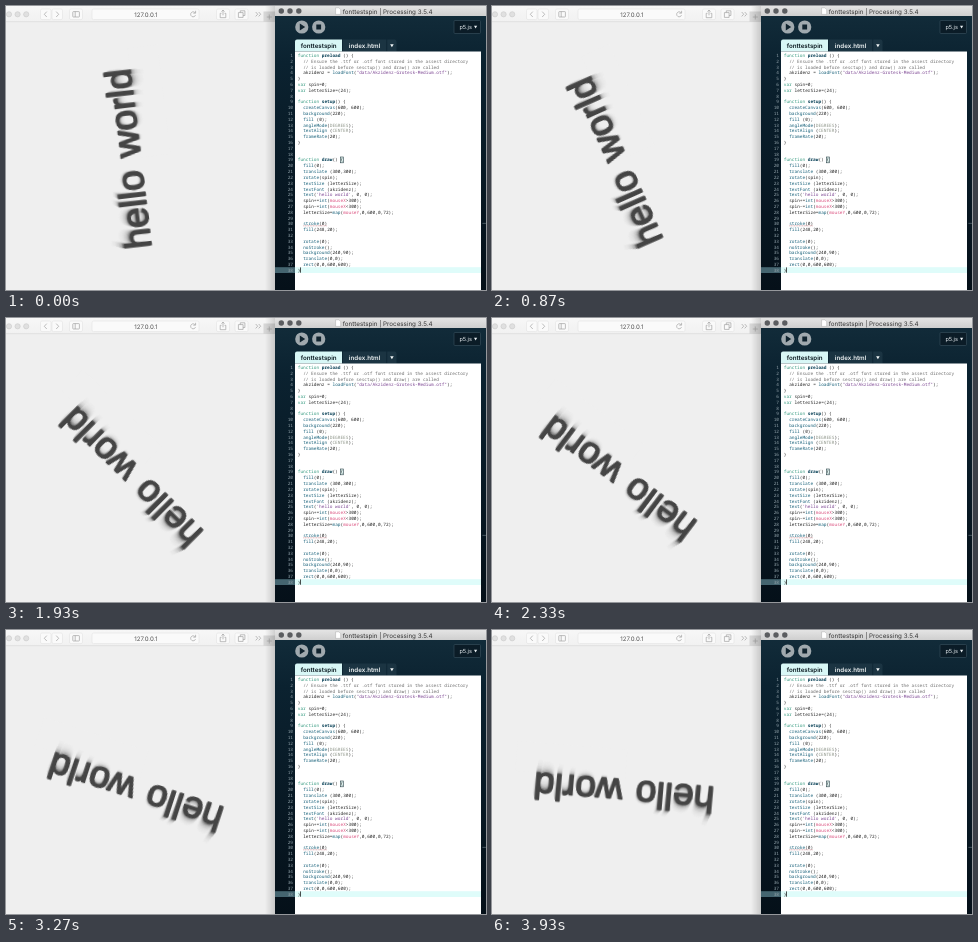
Write an HTML page that moves like this. It is 480 px wide and 284 px high and loops after 3.99 s.

```html
<!DOCTYPE html>
<html lang="en">
<head>
<meta charset="utf-8">
<title>Spinning text sketch</title>
<style>
  html, body { margin: 0; width: 100%; height: 100%; overflow: hidden; background: #efefef; }
  svg { display: block; width: 480px; height: 284px; }
  text { text-rendering: geometricPrecision; }
  .ui { font-family: Inter, "Liberation Sans", sans-serif; }
  .code { font-family: "Noto Sans Mono", "DejaVu Sans Mono", monospace; font-size: 4.45px; fill: #222; white-space: pre; }
  .num { fill: #93a3ab; text-anchor: end; }
  .comment { fill: #6c6c6c; }
  .string { fill: #7d4793; }
  .keyword { fill: #33997e; }
  .hook { fill: #063f55; font-weight: 700; }
  .call { fill: #155f78; }
  .const { fill: #8d9488; }
  .mouse { fill: #d94a7a; }
  .line { fill: none; stroke: #a2a2a2; stroke-width: .7; }
  .button { fill: #fafafa; stroke: #dedede; stroke-width: .5; }
  #word { font: 37.2px "Liberation Sans", Arial, sans-serif; word-spacing: 3px; text-anchor: middle; stroke-width: 1.3; stroke-linejoin: round; }
  #spin { transform-origin: 0 0; animation: spin 3990ms steps(60, end) infinite; }
  @keyframes spin { from { transform: rotate(-96.9deg); } to { transform: rotate(-176.7deg); } }
  #caret { animation: blink 997.5ms steps(1, end) infinite; }
  @keyframes blink { 0%, 86% { opacity: 1; } 50% { opacity: 0; } }
</style>
</head>
<body>
<svg viewBox="0 0 480 284">
  <defs>
    <linearGradient id="bar" x2="0" y2="1"><stop stop-color="#f7f7f7"/><stop offset="1" stop-color="#f1f1f1"/></linearGradient>
    <linearGradient id="title" x2="0" y2="1"><stop stop-color="#e4e4e4"/><stop offset="1" stop-color="#cfcfcf"/></linearGradient>
    <linearGradient id="navy" x2="0" y2="1"><stop stop-color="#132d3b"/><stop offset=".2" stop-color="#0b2230"/><stop offset="1" stop-color="#051019"/></linearGradient>
    <linearGradient id="shade"><stop stop-color="#000" stop-opacity="0"/><stop offset="1" stop-color="#000" stop-opacity=".16"/></linearGradient>
    <text id="word" y="2.1">hello world</text>
  </defs>

  <!-- browser -->
  <rect width="269" height="284" fill="#efefef"/>
  <g transform="translate(132.8 151.7)"><g id="spin"></g></g>
  <rect width="269" height="16" fill="url(#bar)"/>
  <rect y="15.5" width="269" height=".6" fill="#d6d6d6"/>
  <g fill="#e0e0e0" stroke="#cacaca" stroke-width=".6">
    <circle cx="3" cy="8.3" r="2.6"/><circle cx="11.6" cy="8.3" r="2.6"/><circle cx="20.2" cy="8.3" r="2.6"/>
  </g>
  <g class="button">
    <rect x="34.5" y="3" width="10.5" height="10.6" rx="1.5"/><rect x="46" y="3" width="10.5" height="10.6" rx="1.5"/>
    <rect x="63.5" y="3" width="13" height="10.6" rx="1.5"/><rect x="86" y="3" width="107" height="10.6" rx="1.5"/>
    <rect x="210.5" y="3" width="13" height="10.6" rx="1.5"/><rect x="229" y="3" width="13" height="10.6" rx="1.5"/>
  </g>
  <g class="line">
    <path d="M40.8 5.6l-2.5 2.7 2.5 2.7M50.2 5.6l2.5 2.7-2.5 2.7"/>
    <rect x="66.8" y="5.6" width="6.6" height="5.4" rx=".6"/><path d="M69.2 5.6v5.4"/>
    <path d="M189.3 7a2.5 2.5 0 1 0 .2 2.2M189.6 4.8v2.4h-2.3"/>
    <path d="M215.5 7.3h-1.3v4.4h5.6v-4.4h-1.3M217 9.3v-5M215.5 5.6l1.5-1.6 1.5 1.6"/>
    <path d="M234.3 6.6v-1.8h4.6v4.7h-1.8M232.4 6.6h4.7v4.8h-4.7z"/>
    <path d="M249.7 6l2 2.2-2 2.2M252.7 6l2 2.2-2 2.2"/>
  </g>
  <text class="ui" x="139.8" y="10.8" font-size="6.1" fill="#555" text-anchor="middle">127.0.0.1</text>
  <rect x="257.5" y="5.5" width="11.5" height="10.5" fill="#d6d6d6"/>
  <path class="line" d="M260.8 11h5M263.3 8.5v5"/>
  <rect x="259" width="10" height="284" fill="url(#shade)"/>

  <!-- editor -->
  <rect x="269" width="211" height="284" fill="url(#navy)"/>
  <rect x="269" width="211" height="10" fill="url(#title)"/>
  <g fill="#5b5d60"><circle cx="275.3" cy="5" r="2.7"/><circle cx="284" cy="5" r="2.7"/><circle cx="292.8" cy="5" r="2.7"/></g>
  <path d="M329.6 1.8h3.3l1.8 1.8v4.8h-5.1z" fill="#fff" stroke="#999" stroke-width=".4"/>
  <text class="ui" x="381.6" y="7.6" font-size="6.25" fill="#333" text-anchor="middle">fonttestspin | Processing 3.5.4</text>
  <g fill="#a0a9ae"><circle cx="295.8" cy="21" r="6.6"/><circle cx="312.7" cy="21" r="6.6"/></g>
  <path d="M293.8 17.6l5.4 3.4-5.4 3.4zM310.3 18.6h4.8v4.8h-4.8z" fill="#10232e"/>
  <rect x="448" y="14.5" width="26.5" height="13" rx="1" fill="#0b1c27" stroke="#3b5360" stroke-width=".6"/>
  <text class="ui" x="453.4" y="23" font-size="5.6" fill="#e8eef1">p5.js</text>
  <path d="M468 19.8h3.2l-1.6 2.6z" fill="#e8eef1"/>
  <path d="M289 45.5v-10q0-2 2-2h45v12z" fill="#d8f7f6"/>
  <path d="M337 33.5h43.3v12h-43.3zM381.2 33.5h7.3q2 0 2 2v10h-9.3z" fill="#1b3442"/>
  <g class="ui" font-size="6.2" font-weight="600" text-anchor="middle">
    <text x="312.6" y="41.6" fill="#08161d">fonttestspin</text><text x="358.6" y="41.6" fill="#f2f6f7">index.html</text>
  </g>
  <path d="M384.1 38.2h3.6l-1.8 3z" fill="#f2f6f7"/>
  <rect x="289" y="45.5" width="186" height="238.5" fill="#fff"/>
  <rect x="269" y="261.2" width="20" height="5.8" fill="#456570"/>
  <rect x="289" y="261.2" width="186" height="5.8" fill="#dffcfa"/>
  <rect x="334.3" y="151" width="3" height="5.8" fill="#e0f5f3" stroke="#2c4248" stroke-width=".6"/>
  <g id="listing"></g>
  <path d="M297.3 219.8h23.8" stroke="#b9545c" stroke-width=".5" stroke-dasharray="1 .6"/>
  <rect x="476.4" y="216.9" width="3.6" height=".7" fill="#5f6f78"/>
  <rect id="caret" x="294.2" y="261.4" width=".8" height="5.3" fill="#222"/>
</svg>
<script>
  const NS = 'http://www.w3.org/2000/svg';
  const add = (parent, tag, attrs, text) => {
    const el = document.createElementNS(NS, tag);
    for (const key in attrs) el.setAttribute(key, attrs[key]);
    if (text) el.textContent = text;
    return parent.appendChild(el);
  };

  // Fading trail, oldest copy first, one degree apart; the veil lightens one quadrant of it
  const spin = document.getElementById('spin');
  for (let k = 8; k >= 0; k--) {
    const grey = Math.round(239 - 170 * 0.64 ** k);
    const ink = `rgb(${grey},${grey},${grey})`;
    if (k === 0) add(spin, 'rect', { y: 2, width: 110, height: 30, fill: '#efefef', opacity: 0.3 });
    add(spin, 'use', { href: '#word', transform: `rotate(${k})`, fill: ink, stroke: ink });
  }

  const code = `function preload () {
  // Ensure the .ttf or .otf font stored in the assest directory
  // is loaded before sesctup() and draw() are called
  akzidenz = loadFont("data/Akzidenz-Grotesk-Medium.otf");
}
var spin=0;
var letterSize=(24);

function setup() {
  createCanvas(600, 600);
  background(220);
  fill (0);
  angleMode(DEGREES);
  textAlign (CENTER);
  frameRate(20);
}


function draw() {
  fill(0);
  translate (300,300);
  rotate(spin);
  textSize (letterSize);
  textFont (akzidenz);
  text('hello world', 0, 0);
  spin+=int(mouseX>300);
  spin-=int(mouseX<300);
  letterSize=map(mouseY,0,600,0,72);

  stroke(0)
  fill(248,20);

  rotate(0);
  noStroke();
  background(240,90);
  translate(0,0);
  rect(0,0,600,600);
}`;

  const rules = [
    ['comment', '\\/\\/.*'],
    ['string', '"[^"]*"|\'[^\']*\''],
    ['keyword', '\\b(?:function|var)\\b'],
    ['hook', '\\b(?:preload|setup|draw)\\b'],
    ['const', '\\b(?:DEGREES|CENTER)\\b'],
    ['mouse', '\\bmouse[XY]\\b'],
    ['call', '\\b[a-zA-Z]+(?= ?\\()']
  ];
  const lexer = new RegExp(rules.map(([name, src]) => `(?<${name}>${src})`).join('|') + '|[^]', 'g');
  const listing = document.getElementById('listing');

  code.split('\n').forEach((line, i) => {
    const y = 50.9 + i * 5.81;
    add(listing, 'text', { class: 'code num', x: 287, y }, String(i + 1));
    const body = line.trimStart();
    const row = add(listing, 'text', { class: 'code', x: 291.8 + (line.length - body.length) * 2.67, y });
    for (const m of body.matchAll(lexer)) {
      const kind = Object.keys(m.groups).find(name => m.groups[name]);
      add(row, 'tspan', kind ? { class: kind } : {}, m[0]);
    }
  });
</script>
</body>
</html>
```
